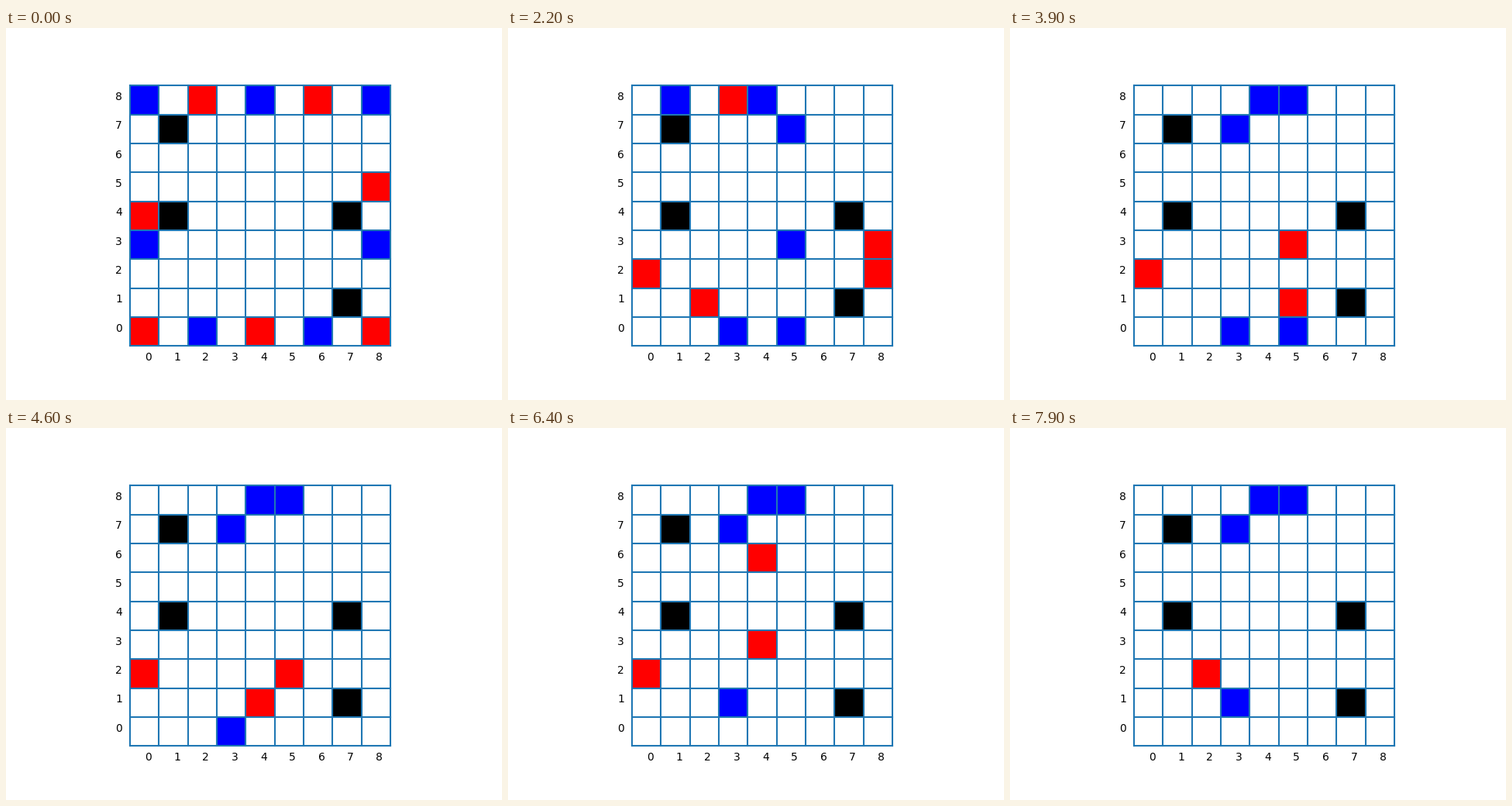
A matplotlib script that plays this animation: 640x480 px, repeating every 8 s.

```python
import matplotlib.pyplot as plt
from matplotlib.animation import FuncAnimation
from matplotlib.patches import Rectangle

N = 9
STEPS = {"L": (-1, 0), "R": (1, 0), "U": (0, 1), "D": (0, -1)}
WALLS = [(1, 7), (1, 4), (7, 4), (7, 1)]

# Each run is a start cell followed by one-cell steps.
BLUE_RUNS = ("20R 60L 83LLL 08R 03D 88LLDL 18RDR 57U 50L 40UD 53D 40RLRU 30"
             + "UD" * 8 + "U")
RED_RUNS = ("85D 80UU 84D 68L 00U 04DD 01RR 28R 21R 82LLD 83LL 61L 63L 51U "
            "53LDDUU 52UDUUULUU 43UUUU 02RR")


def cells(text):
    return [(int(c[0]), int(c[1])) for c in text.split()]


def shift(cell, step):
    return cell[0] + step[0], cell[1] + step[1]


def moves(runs):
    for run in runs.split():
        cell = int(run[0]), int(run[1])
        for key in run[2:]:
            target = shift(cell, STEPS[key])
            yield cell, target
            cell = target


def capture(board):
    """Drop every piece that touches two or more opponents."""
    def enemies(cell):
        near = (board.get(shift(cell, s)) for s in STEPS.values())
        return sum(c is not None and c != board[cell] for c in near)
    return {cell: color for cell, color in board.items() if enemies(cell) < 2}


def play():
    board = {c: "blue" for c in cells("08 48 88 83 03 20 60")}
    board.update({c: "red" for c in cells("28 68 85 04 00 40 80")})
    states = [board]
    turns = {"blue": moves(BLUE_RUNS), "red": moves(RED_RUNS)}
    for turn in range(79):
        start, end = next(turns["red" if turn % 2 else "blue"])
        board = dict(board)
        board[end] = board.pop(start)
        board = capture(board)
        states.append(board)
    return states


states = play()

fig, ax = plt.subplots(figsize=(6.4, 4.8), dpi=100)
ax.set_aspect("equal")
ax.axis("off")

for i in range(N + 1):
    ax.plot([0, N], [i, i], color="C0", lw=1.5)
    ax.plot([i, i], [0, N], color="C0", lw=1.5)
for i in range(N):
    ax.text(i + 0.5, -0.5, str(i))
    ax.text(-0.5, i + 0.5, str(i))
for wall in WALLS:
    ax.add_patch(Rectangle(wall, 1, 1, fc="black", lw=0))

tiles = {}
for x in range(N):
    for y in range(N):
        tiles[x, y] = ax.add_patch(Rectangle((x, y), 1, 1, fc="none", lw=0))


def draw(i):
    for cell, tile in tiles.items():
        tile.set_facecolor(states[i].get(cell, "none"))
    return list(tiles.values())


anim = FuncAnimation(fig, draw, frames=len(states), interval=100,
                     repeat=True, repeat_delay=0)
plt.show()
```
